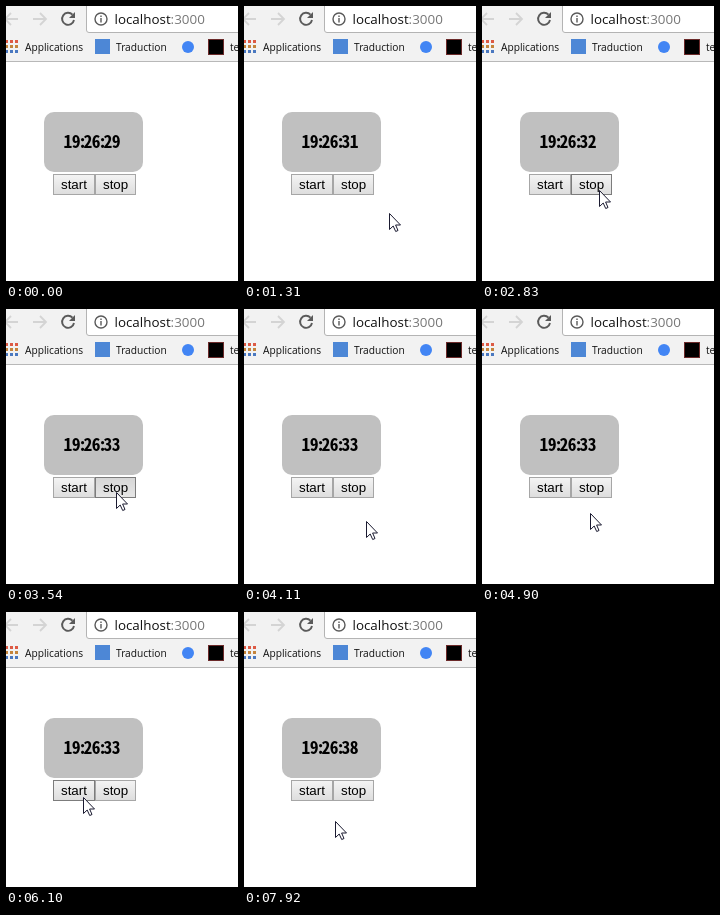
Animation, 232 px wide and 275 px high, one loop 8 s. Source, as an HTML page:

```html
<!DOCTYPE html>
<html lang="en">
<head>
<meta charset="utf-8">
<title>Clock</title>
<style>
html, body { margin: 0; width: 100%; height: 100%; overflow: hidden; background: #fff; }
svg { display: block; width: 232px; height: 275px; }
.bar { font: 10.2px "Open Sans", "Noto Sans", sans-serif; fill: #111; }
.url { font: 13.4px "Open Sans", "Noto Sans", sans-serif; fill: #111; }
.url tspan { fill: #777; }
.clock { font: 900 17.5px "Noto Sans CJK JP", "Noto Sans CJK", sans-serif; font-feature-settings: "hwid"; letter-spacing: -.6px; }
.clock .sep { font-feature-settings: normal; letter-spacing: -2px; }
.btn text { font: 13.333px "Liberation Sans", Arial, sans-serif; }
.btn rect { fill: url(#face); stroke: #a6a6a6; }
.btn.hover rect { stroke: #7c7c7c; }
.btn.down rect { fill: url(#sunk); }
</style>
</head>
<body>
<svg viewBox="0 0 232 275">
  <defs>
    <linearGradient id="face" x2="0" y2="1"><stop stop-color="#f4f4f4"/><stop offset="1" stop-color="#ddd"/></linearGradient>
    <linearGradient id="sunk" x2="0" y2="1"><stop stop-color="#d6d6d6"/><stop offset="1" stop-color="#e6e6e6"/></linearGradient>
  </defs>

  <!-- toolbar -->
  <rect width="232" height="56" fill="#f2f2f2"/>
  <path d="M0 55.5H232" stroke="#b8b8b8"/>
  <g fill="none" stroke="#d4d4d4" stroke-width="1.8">
    <path d="M-2 13H12M5 7L-1 13L5 19"/>
    <path d="M27 13H40M34 7L40 13L34 19"/>
  </g>
  <path d="M66.500 8.700A6 6 0 1 0 68 14" fill="none" stroke="#5a5a5a" stroke-width="1.9"/>
  <path d="M69 6V12H63Z" fill="#5a5a5a"/>
  <path d="M80.500 -1V24Q80.500 26.500 83 26.500H233V-1Z" fill="#fff" stroke="#b4b4b4"/>
  <g fill="none" stroke="#5a5a5a" stroke-width="1.4">
    <circle cx="95" cy="13" r="6"/>
    <path d="M95 9.500V11M95 12V16.500"/>
  </g>
  <text class="url" x="108.500" y="18">localhost<tspan>:3000</tspan></text>

  <!-- bookmarks -->
  <g stroke-width="3" stroke-dasharray="3 2">
    <path d="M-1 35.500H12" stroke="#dd5a44"/>
    <path d="M-1 40.500H12" stroke="#c4843c"/>
    <path d="M-1 45.500H12" stroke="#4a78c0"/>
  </g>
  <text class="bar" x="19" y="45">Applications</text>
  <rect x="89" y="33" width="15" height="15" fill="#4d87d6"/>
  <text class="bar" x="110" y="45">Traduction</text>
  <circle cx="182" cy="41" r="6" fill="#4285f4"/>
  <rect x="202.500" y="33.500" width="15" height="15" stroke="#6b2a2a"/>
  <text class="bar" x="224" y="45">te</text>

  <!-- page -->
  <rect x="38" y="106" width="99" height="60" rx="10" fill="#c0c0c0"/>
  <text class="clock" x="57.500" y="142">19<tspan class="sep">:</tspan>26<tspan class="sep">:</tspan><tspan id="sec">29</tspan></text>
  <g class="btn" id="start"><rect x="47.500" y="168.500" width="41" height="20"/><text x="55" y="183">start</text></g>
  <g class="btn" id="stop"><rect x="89.500" y="168.500" width="40" height="20"/><text x="97" y="183">stop</text></g>
  <path id="cursor" d="M.5 .5V16.500L4.200 13L6.700 18.500L9 17.500L6.600 12H11.500Z" fill="#fff" stroke="#1a1a30"/>
</svg>
<script>
const LOOP = 8000, STEP = 50, SECOND = 1000;
const FIRST_TICK = 130, STOP = 3490, RESTART = 5910, PRESS = 140;
const $ = id => document.getElementById(id);

// pointer key points: time, x, y
const path = [
  [850, 170, 276], [1300, 145, 207], [1650, 131, 191], [2000, 123, 187],
  [2800, 117, 184], [3550, 110, 183], [3800, 110, 183], [4100, 122, 212],
  [4700, 122, 212], [5300, 81, 188], [5450, 77, 182], [6050, 77, 182],
  [6100, 77, 185], [6300, 91, 209]
];

function pointerAt(t) {
  t = Math.floor(t / STEP) * STEP;
  const i = path.findIndex(p => p[0] > t);
  if (i < 1) return (i ? path[path.length - 1] : path[0]).slice(1);
  const [a, b] = [path[i - 1], path[i]];
  const p = (t - a[0]) / (b[0] - a[0]);
  return [1, 2].map(k => Math.round(a[k] + (b[k] - a[k]) * p));
}

// The timer ticks once a second from its start and shows the wall clock then.
function secondsAt(t) {
  const resumed = t >= RESTART + SECOND;
  const origin = resumed ? RESTART : FIRST_TICK;
  const now = resumed ? t : Math.min(t, STOP);
  const tick = origin + Math.floor((now - origin) / SECOND) * SECOND;
  return Math.floor(30.8 + tick / SECOND);
}

function paintButton(id, x, y, left, right, release, t) {
  const { classList } = $(id);
  classList.toggle('hover', x >= left && x < right && y >= 168 && y < 189);
  classList.toggle('down', t >= release - PRESS && t < release);
}

function draw() {
  const t = performance.now() % LOOP;
  const [x, y] = pointerAt(t);
  $('cursor').setAttribute('transform', `translate(${x} ${y})`);
  $('sec').textContent = secondsAt(t);
  paintButton('start', x, y, 47, 89, RESTART, t);
  paintButton('stop', x, y, 89, 130, STOP + PRESS, t);
  requestAnimationFrame(draw);
}
draw();
</script>
</body>
</html>
```
